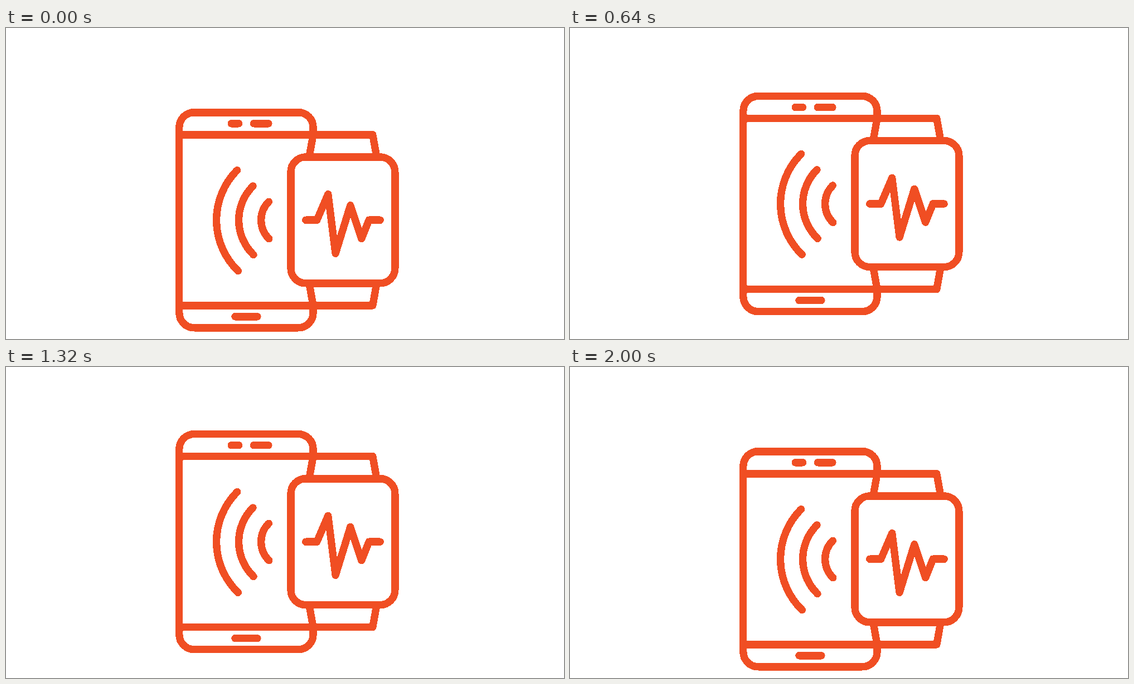
An HTML page with a canvas that plays this animation: 1001 by 559 pixels, repeating every 2040 ms.

```html
<!DOCTYPE html>
<html lang="en">
<head>
<meta charset="utf-8">
<title>Phone and watch</title>
<style>
  html, body { margin: 0; width: 100%; height: 100%; overflow: hidden; background: #fff; }
  canvas { display: block; }
</style>
</head>
<body>
<canvas id="stage" width="1001" height="559"></canvas>
<script>
const canvas = document.getElementById('stage');
const ctx = canvas.getContext('2d', { willReadFrequently: true });
const INK = [240, 78, 35];
const PAPER = [255, 255, 255];
const css = color => `rgb(${color})`;

const LOOP = 2040, STEP = 40, HALF = 1000;
const RISE = 45.75;
const UNIT = 6.673;                 // the icon sits on a 60 x 60 grid
const LEFT = 304.13, TOP = 145.1;
const MID = 30;

function line(...points) {
  ctx.beginPath();
  points.forEach(([x, y]) => ctx.lineTo(x, y));
  ctx.stroke();
}

function body(x, y, w, h) {
  ctx.beginPath();
  ctx.roundRect(x, y, w, h, 4);
  ctx.fill();
  ctx.stroke();
}

// A strap end that widens from y = end towards the watch body.
function strap(end, base) {
  const center = 45, narrow = 8, wide = 9.08;
  ctx.beginPath();
  ctx.moveTo(center - wide, base);
  ctx.lineTo(center - narrow, end);
  ctx.lineTo(center + narrow, end);
  ctx.lineTo(center + wide, base);
  ctx.fill();
  ctx.stroke();
}

function wave(radius) {
  const deg = Math.PI / 180;
  ctx.beginPath();
  ctx.arc(MID, MID, radius, 134 * deg, 225 * deg);
  ctx.stroke();
}

function drawIcon() {
  ctx.fillStyle = css(PAPER);
  ctx.strokeStyle = css(INK);
  ctx.lineWidth = 2;
  ctx.lineCap = ctx.lineJoin = 'round';

  body(1, 1, 36, 58);
  strap(7, 13);
  strap(53, 47);
  for (const y of [7, 53]) line([1, y], [37, y]);
  body(31, 13, 28, 34);

  line([15, 4], [17, 4]);
  line([21, 4], [25, 4]);
  line([16, 56], [22, 56]);
  for (let r = 7; r <= 19; r += 6) wave(r);
  line([35, MID], [38, MID], [41, 23], [43, 39], [47, 26], [50, 35], [52, MID], [55, MID]);
}

// Hard edges: every pixel becomes plain ink or plain paper.
function sharpen() {
  const image = ctx.getImageData(0, 0, canvas.width, canvas.height);
  const px = image.data;
  const cut = (INK[1] + PAPER[1]) / 2;
  for (let i = 0; i < px.length; i += 4) {
    const color = px[i + 1] < cut ? INK : PAPER;
    px[i] = color[0];
    px[i + 1] = color[1];
    px[i + 2] = color[2];
  }
  ctx.putImageData(image, 0, 0);
}

function draw(t) {
  const lift = RISE * (1 - Math.abs(t - HALF) / HALF);
  ctx.setTransform(1, 0, 0, 1, 0, 0);
  ctx.fillStyle = css(PAPER);
  ctx.fillRect(0, 0, canvas.width, canvas.height);
  ctx.setTransform(UNIT, 0, 0, UNIT, LEFT, TOP - lift);
  drawIcon();
  sharpen();
}

const start = performance.now();
let shown = -1;
function tick() {
  const t = Math.floor(((performance.now() - start) % LOOP) / STEP) * STEP;
  if (t !== shown) draw(shown = t);
  requestAnimationFrame(tick);
}
tick();
</script>
</body>
</html>
```
